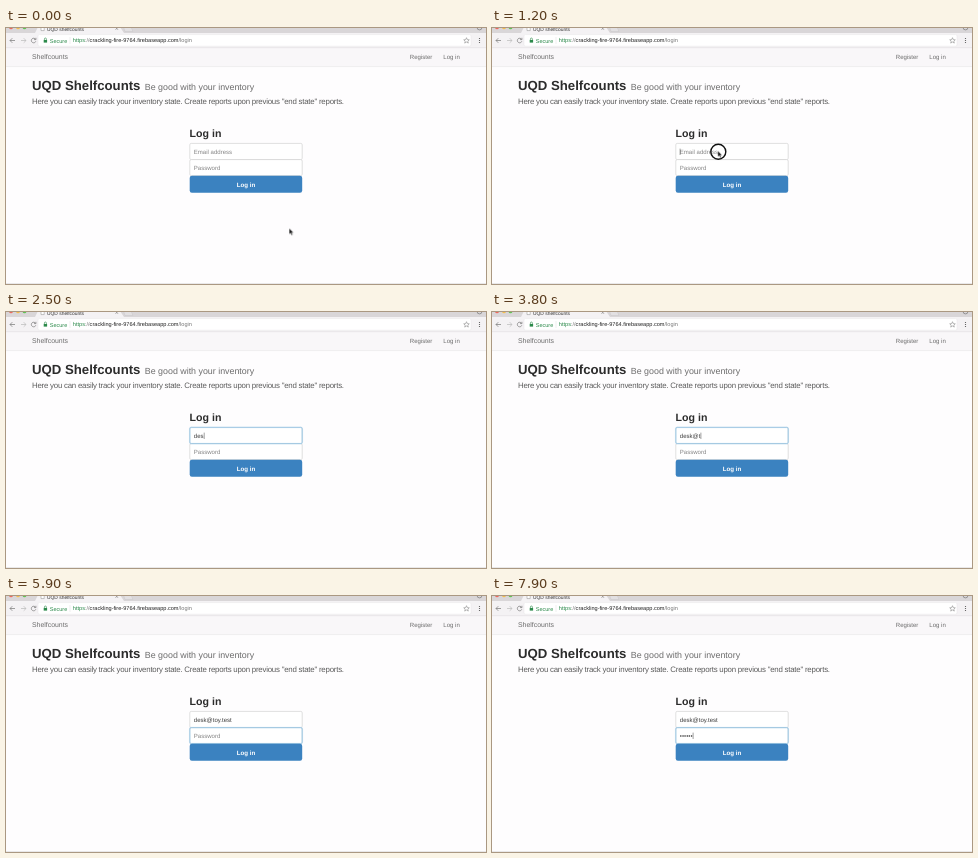
An HTML page that plays this animation: 480 by 256 pixels, repeating every 8000 ms.

```html
<!DOCTYPE html>
<html lang="en">
<head>
<meta charset="utf-8">
<title>Log in</title>
<style>
  html, body { margin: 0; width: 100%; height: 100%; overflow: hidden; background: #fefdfe; }
  svg { display: block; width: 480px; height: 256px; }
  text {
    font-family: "Liberation Sans", Arial, sans-serif;
    font-size: 6.05px;
    text-rendering: geometricPrecision;
    white-space: pre;
  }
  .strong { font-weight: bold; fill: #2c2c2c; }
  .muted { fill: #6c6c6c; }
  .lead { font-size: 7.87px; letter-spacing: -.23px; fill: #5c5c5c; }
  .hint { fill: #858585; }
  .typed { fill: #3c3c3c; }
  .field { fill: #fff; stroke: #ccc; stroke-width: .6px; }
  .focus { fill: none; stroke: #86c0e6; stroke-width: .6px; opacity: 0; }
  .glow { stroke-width: 1.8px; stroke-opacity: .2; }
  .icon { fill: none; stroke: #777; stroke-width: .7px; }

  #emailFocus { animation: email-focus 8s linear infinite; }
  #passFocus { animation: pass-focus 8s linear infinite; }
  #pointer { animation: pointer 8s linear infinite; }
  #ring { opacity: 0; animation: ring 8s linear infinite; }

  @keyframes email-focus {
    0%, 15.2% { opacity: 0; }
    17.2%, 67% { opacity: 1; }
    69%, 100% { opacity: 0; }
  }
  @keyframes pass-focus {
    0%, 67% { opacity: 0; }
    69%, 100% { opacity: 1; }
  }
  @keyframes pointer {
    0%, .8% { transform: translate(283.2px, 200.3px); opacity: 1; animation-timing-function: ease-in-out; }
    12%, 24.49% { transform: translate(225.8px, 122.8px); opacity: 1; }
    24.5%, 100% { transform: translate(225.8px, 122.8px); opacity: 0; }
  }
  @keyframes ring {
    0%, 13.2% { opacity: 0; }
    13.3%, 17.5% { opacity: 1; }
    19%, 100% { opacity: 0; }
  }
</style>
</head>
<body>
<svg viewBox="0 0 480 256">
  <rect width="480" height="256" fill="#fefdfe"/>

  <!-- browser bar -->
  <rect width="480" height="5" fill="#d9d6d8"/>
  <circle cx="5" cy="-.8" r="2" fill="#ee6a5f"/>
  <circle cx="12" cy="-.8" r="2" fill="#f5bd4f"/>
  <circle cx="18.5" cy="-.8" r="2" fill="#61c454"/>
  <circle cx="473.5" cy="-.5" r="2.4" class="icon"/>
  <path d="M29 5 32 -1H114L118 5Z" fill="#f4f2f4"/>
  <path d="M119 3.5 117.5 -1H125L127 3.5Z" fill="#e2e0e2" stroke="#c2c0c2" stroke-width=".4"/>
  <path d="M35 -1V2.6H38.2V-1" fill="#fff" stroke="#888" stroke-width=".5"/>
  <text x="41" y="2.6" style="font-size:4.9px" fill="#333">UQD shelfcounts</text>
  <path d="M109.5 -.8 112 1.8M112 -.8 109.5 1.8" class="icon" style="stroke-width:.6px"/>
  <rect y="5" width="480" height="15" fill="#f4f2f4"/>
  <rect x="32" y="6.6" width="433" height="11.6" rx="1.4" fill="#fff" stroke="#e2e0e2" stroke-width=".4"/>
  <path class="icon" d="M9 12.5H4M6.3 10.2 4 12.5 6.3 14.8"/>
  <path class="icon" style="stroke:#bbb" d="M15 12.5H20M17.7 10.2 20 12.5 17.7 14.8"/>
  <path class="icon" d="M29.6 11.3A2.3 2.3 0 1 0 29.8 13.3M29.9 9.8V11.6H28"/>
  <rect x="37.7" y="12" width="3.4" height="2.6" fill="#2c8a4b"/>
  <path d="M38.4 12V11A1 1 0 0 1 40.4 11V12" fill="none" stroke="#2c8a4b" stroke-width=".6"/>
  <text x="43.8" y="14.5" style="font-size:5.5px" fill="#2c8a4b">Secure</text>
  <path d="M64 9V16" stroke="#ddd" stroke-width=".5"/>
  <text x="66.8" y="14.4" style="font-size:5.6px" fill="#222"><tspan fill="#2c8a4b">https</tspan><tspan fill="#777">://</tspan>crackling-fire-9764.firebaseapp.com<tspan fill="#777">/login</tspan></text>
  <path transform="translate(460.5 12.5)" d="M0 -2.8 .8 -.9 2.8 -.7 1.3 .6 1.8 2.6 0 1.5 -1.8 2.6 -1.3 .6 -2.8 -.7 -.8 -.9Z" fill="none" stroke="#777" stroke-width=".5"/>
  <path d="M473.5 10V15.2" stroke="#666" stroke-width="1.1" stroke-dasharray="1.1 .9"/>

  <!-- navigation -->
  <rect y="19.6" width="480" height="19" fill="#f9f7f9"/>
  <path d="M0 19.7H480" stroke="#d8d6d8" stroke-width=".5"/>
  <path d="M0 38.6H480" stroke="#e8e6e8" stroke-width=".6"/>
  <text x="26" y="31.3" style="font-size:6.9px" class="muted">Shelfcounts</text>
  <text x="403.8" y="31.2" class="muted">Register</text>
  <text x="437.3" y="31.2" class="muted">Log in</text>

  <!-- page -->
  <text x="26" y="62" style="font-size:13.2px" class="strong">UQD Shelfcounts</text>
  <text x="138.8" y="62" style="font-size:8.87px" class="muted">Be good with your inventory</text>
  <text x="26" y="76" class="lead">Here you can easily track your inventory state. Create reports upon previous "end state" reports.</text>

  <text x="183.6" y="109" style="font-size:10.6px" class="strong">Log in</text>
  <rect class="field" x="183.8" y="115.4" width="112.4" height="16.2" rx="1.4"/>
  <rect class="field" x="183.8" y="131.6" width="112.4" height="16" rx="1.4"/>
  <g id="emailFocus" class="focus">
    <rect class="glow" x="183.8" y="115.4" width="112.4" height="16.2" rx="1.4"/>
    <rect x="183.8" y="115.4" width="112.4" height="16.2" rx="1.4"/>
  </g>
  <g id="passFocus" class="focus">
    <rect class="glow" x="183.8" y="131.6" width="112.4" height="16" rx="1.4"/>
    <rect x="183.8" y="131.6" width="112.4" height="16" rx="1.4"/>
  </g>
  <text id="email" x="187.8" y="126"></text>
  <text id="pass" x="187.8" y="142"></text>
  <rect id="caret" width=".5" height="6.4" fill="#444"/>

  <rect x="183.7" y="147.8" width="112.5" height="17" rx="2.2" fill="#3b82c0"/>
  <text x="240" y="158.6" text-anchor="middle" style="font-size:6.2px;font-weight:bold" fill="#fff">Log in</text>
  <path d="M0 255.7H480" stroke="#d4d2d4" stroke-width=".6"/>

  <circle id="ring" cx="226.3" cy="123.8" r="7.5" fill="none" stroke="#111" stroke-width="1.4"/>
  <path id="pointer" d="M0 0V6L1.4 4.8 2.3 7 3.4 6.5 2.5 4.5H4.3Z" fill="#111" stroke="#fff" stroke-width=".4"/>
</svg>
<script>
  const LOOP = 8000, BLINK = 500;
  const caret = document.getElementById("caret");
  const fields = [
    { id: "email", value: "desk@toy.test", hint: "Email address", from: 1160, to: 5360,
      keys: [1960, 2160, 2360, 2660, 3260, 3660, 3860, 4060, 4260, 4460, 4660, 4860, 5160] },
    { id: "pass", value: "••••••", hint: "Password", from: 5360, to: LOOP,
      keys: [6260, 6460, 6760, 6960, 7260, 7460] }
  ];
  for (const f of fields) f.node = document.getElementById(f.id);

  function drawField(f, time) {
    const pressed = f.keys.filter(k => k <= time);
    const text = f.value.slice(0, pressed.length);
    f.node.textContent = text || f.hint;
    f.node.setAttribute("class", text ? "typed" : "hint");
    if (time < f.from || time >= f.to) return;

    const last = pressed.length ? pressed[pressed.length - 1] : f.from;
    const width = text ? f.node.getComputedTextLength() : 0;
    caret.setAttribute("x", 187.8 + width + (text ? .3 : 0));
    caret.setAttribute("y", f.node.getAttribute("y") - 5.4);
    caret.style.opacity = Math.floor((time - last) / BLINK) % 2 ? 0 : 1;
  }

  const start = performance.now();
  function draw() {
    const time = (performance.now() - start) % LOOP;
    caret.style.opacity = 0;
    for (const f of fields) drawField(f, time);
    requestAnimationFrame(draw);
  }
  draw();
</script>
</body>
</html>
```
